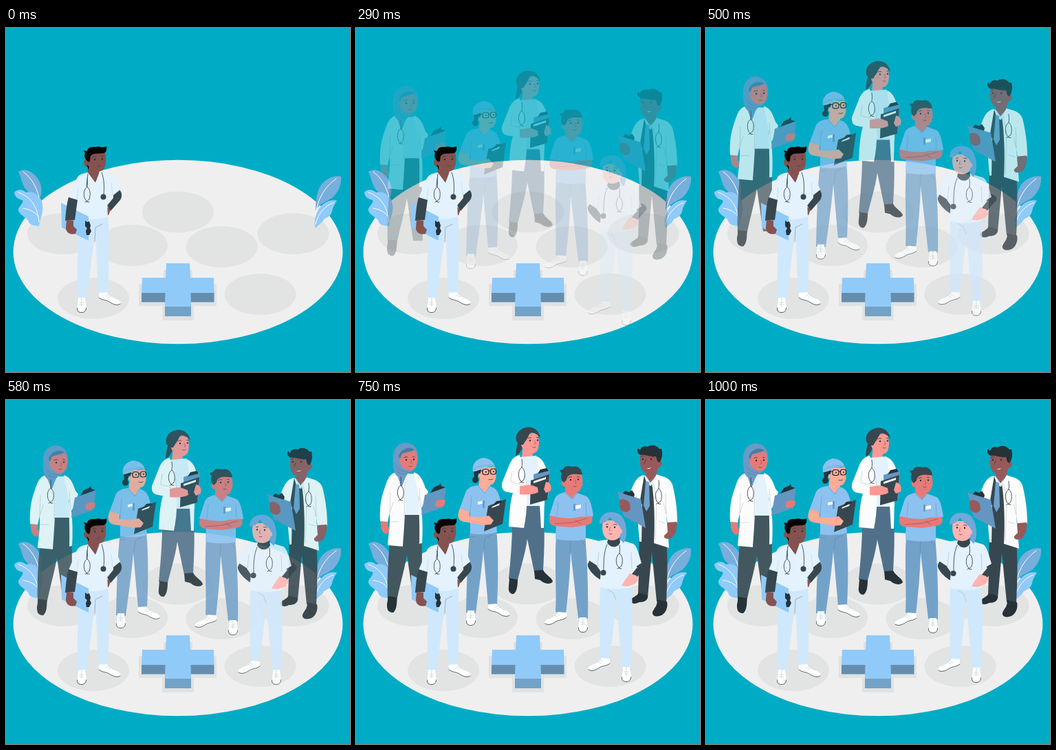
Write an HTML page that moves like this. It is 500 px wide and 500 px high and loops after 1.04 s.

```html
<!DOCTYPE html>
<html lang="en">
<head>
<meta charset="utf-8">
<title>Medical team</title>
<style>
  html, body { margin: 0; width: 100%; height: 100%; overflow: hidden; background: #00acc5; }
  svg { display: block; width: 100%; height: 100%; }
  .ink { fill: #263238; } .slate { fill: #37474f; } .black { fill: #050505; }
  .white { fill: #fcfcfc; } .pale { fill: #e3f2fd; } .ice { fill: #d0e8fc; }
  .sky { fill: #90caf9; } .scrub { fill: #8cc1f0; } .denim { fill: #73a2c9; }
  .steel { fill: #6b9ac6; } .board { fill: #6596c2; } .azure { fill: #72a8da; }
  .spot { fill: #e2e4e3; }
  .rose { fill: #e57b79; } .coral { fill: #ff9792; } .peach { fill: #ffac98; }
  .blush { fill: #ffb4b0; } .brown { fill: #98595a; } .umber { fill: #85524f; }
  .line { fill: none; stroke: #37474f; stroke-width: .9; stroke-linecap: round; stroke-linejoin: round; }
  .soft { stroke: #a94d4b; stroke-width: .7; }
  .lace { stroke: #b9cfdd; stroke-width: .7; }
  .fold { fill: none; stroke: #263238; stroke-opacity: .22; stroke-width: .8; stroke-linecap: round; }
  .vein { fill: none; stroke: #fff; stroke-width: 1; stroke-linecap: round; }
</style>
</head>
<body>
<svg viewBox="0 0 500 500">
  <defs>
    <g id="face">
      <circle r="1.2" class="ink"/><circle cx="11" cy="-.6" r="1.2" class="ink"/>
      <path class="line" d="M-3-3.4Q-1-4.8 1.500-4.2M9.500-4.6Q11-5.2 12.500-4"/>
      <path class="line soft" d="M6.5 0L8 4.500L6 5"/>
      <path class="line" d="M4 9.500Q6 10.800 8 9.500" style="stroke-width:.7"/>
    </g>
    <path id="tubes" class="line" d="M0-12Q1-6 0 0C-5 3-6 12-3 18L0 21M0 0C5 3 5 12 3 18L-1 21M-3 22L-1 21L0 22L3 22"/>
    <g id="toe">
      <path d="M2 0H12C12 6 14 11 13.500 16C13 20 10 21.500 7 21.500C3 21.500 0 19 .5 15C1 9 2 7 2 0Z" fill="#fff"/>
      <path class="line" d="M.5 15C0 20 3 21.500 7 21.500C11 21.500 13.500 19 13.500 15"/>
      <path class="line lace" d="M4 7L10 7M4 10L10 10M7 0L6.500 12"/>
    </g>
    <g id="side">
      <path d="M1 1L13 0C16 5 20 8 27 10C31 12 34 14 32 17C28 20 22 18 16 15C11 12 6 12 1 9Z" fill="#fff"/>
      <path class="line" d="M1 8C6 12 11 11 16 14C22 18 28 20 32 17"/>
      <path class="line lace" d="M11 6L15 3M14 8L18 5"/>
    </g>
  </defs>

  <ellipse cx="250" cy="325.500" rx="239.400" ry="133.800" fill="#efefef"/>
  <g id="spots" class="spot"></g>

  <g id="cross">
    <path fill="#e0e2e2" d="M229 352H271V372H306V404H273V425H227V404H193V372H229Z"/>
    <path fill="#658dae" d="M197 384H302.500V398.500H197Z"/>
    <path fill="#73a2c7" d="M231 403H269V419H231Z"/>
    <path class="sky" d="M233 342H267L268 363H302L302.500 385H268.500L269 405H231L231.500 385H197L198 363H232Z"/>
  </g>

  <g id="plants">
    <path fill="#78aedb" d="M18 209C27 202 40 209 47 220C53 230 52 239 50 246C43 238 36 242 30 236C23 229 24 221 18 209Z"/>
    <path class="sky" d="M12 239C17 233 25 235 29 239C40 236 51 244 53 256C55 266 50 276 48 288C39 287 33 286 32 279C26 273 17 270 18 263C20 258 26 254 24 250C18 249 13 246 12 239Z"/>
    <path class="vein" d="M25 209C37 218 44 230 48 246M18 239C34 244 46 258 48 282M25 262Q40 264 47 274"/>
    <path fill="#78aedb" d="M487 216C479 213 466 218 458 228C451 239 450 252 450 266C455 255 465 253 474 247C482 240 488 229 487 216Z"/>
    <path class="sky" d="M481 251C472 248 460 254 454 264C449 273 447 282 450 291C454 286 460 283 462 278C467 275 472 274 474 266C475 260 478 256 481 251Z"/>
    <path class="vein" d="M480 219C464 231 453 246 450 272M476 254C464 258 453 270 450 285"/>
  </g>

  <g id="crew">
    <g id="ponytail">
      <path fill="#50708a" d="M227 180L246 150H271C275 185 274 215 272 249L259 251L249 203C246 225 239 245 235 263L222 261C225 230 227 205 227 180Z"/>
      <path class="ink" d="M223 260L235 262C235 270 234 280 229 283C223 283 221 278 222 272ZM259 249L272 248C275 255 285 259 286 265C282 270 273 268 268 263L260 261Z"/>
      <path class="slate" d="M240 56C233 62 233 75 232 82C237 81 242 73 243 64Z"/>
      <path class="coral" d="M243 66H256L257 88L248 94L241 84Z"/>
      <path class="pale" d="M238 84L262 82L274 105V155H242Z"/>
      <path class="white" d="M238 81C229 83 225 89 222 97L212 122C211 132 216 135 223 135L228 136C223 153 223 170 222 185L244 187C250 160 249 130 246 110Z"/>
      <path class="white" d="M263 83C272 87 275 95 278 106L281 124L274 139L273 187L269 187L267 153V110Z"/>
      <path class="fold" d="M227 104L225 120L240 124M228 136L227 123M246 110L249 137"/>
      <path class="white" d="M219 119L240 125L239 138L221 135Z"/>
      <path class="board" d="M258 109L282 101L280 142L259 145Z"/>
      <path class="ink" d="M264 108L268 102L277 100L280 104Z"/>
      <path class="slate" d="M254 118L281 109L278 146L253 153Z"/>
      <path d="M258 119L276 113V116L258 122Z" fill="#fff"/>
      <path class="coral" d="M238 126C246 125 251 123 256 125L264 128L265 135C257 139 247 139 238 138ZM276 120C282 120 285 126 283 133L276 136L273 131Z"/>
      <path class="coral" d="M243 52L262 48C267 56 267 66 264 74C260 81 250 80 245 73C239 70 239 62 243 62Z"/>
      <path class="slate" d="M233 60C231 51 237 43 247 41C257 39 266 45 268 56C264 51 260 49 255 48C251 50 250 57 246 61L243 66C239 66 235 65 233 60Z"/>
      <use href="#face" x="253" y="60"/>
      <use href="#tubes" x="241" y="99"/>
    </g>

    <g id="hijab">
      <path fill="#43575f" d="M68 150H92C96 180 96 220 96 245L97 288H83L74 226C70 250 63 272 59 294L46 291C45 255 47 229 50 201Z"/>
      <path class="ink" d="M47 286L59 288C60 296 59 306 54 310C46 310 45 305 45 298Z"/>
      <path class="pale" d="M66 108H88L94 168H68Z"/>
      <path class="rose" d="M36 174L47 175L46 184L50 192L44 196C38 194 35 188 36 174Z"/>
      <path class="white" d="M60 106C50 107 47 114 44 122C38 139 34 150 35 177L46 178L49 165C50 182 47 198 46 212L68 214C70 188 73 145 71 119Z"/>
      <path class="white" d="M84 106C94 109 97 118 101 129L105 134L97 155L95 158C97 175 97 194 96 209L92 210C93 185 91 165 92 145Z"/>
      <path class="fold" d="M50 136L49 165L54 150M71 120L70 170M92 130L94 157M50 178H62"/>
      <path class="board" d="M100 139L131 128L127 157L95 168Z"/>
      <path class="ink" d="M108 136L113 128L120 125L123 122L124 126L130 128Z"/>
      <path class="rose" d="M116 149C120 145 126 145 130 147L129 153C124 158 118 157 115 155Z"/>
      <path class="steel" d="M54 88C53 72 62 62 74 63C85 65 90 72 90 83C91 96 85 104 77 107C70 112 70 122 66 128L61 113C54 107 54 98 54 88Z"/>
      <path class="rose" d="M65 80C72 78 79 77 85 74C91 81 90 95 85 101C78 106 70 102 66 97C62 90 62 84 65 80Z"/>
      <path fill="#507aa0" d="M62 82C66 72 76 68 85 73C81 76 74 76 67 79L64 87Z"/>
      <path class="fold" d="M58 97Q64 106 76 106M59 104Q65 110 73 109"/>
      <use href="#face" x="73" y="88"/>
      <use href="#tubes" x="65" y="125"/>
    </g>

    <g id="physician">
      <path class="slate" d="M411 180L448 182C454 213 453 260 451 296L437 294L430 222L424 288L410 284C411 250 412 215 411 180Z"/>
      <path class="ink" d="M411 281L424 285C425 292 419 295 411 295C404 299 399 296 398 293C400 288 408 287 411 281ZM438 291L452 294C454 302 450 311 444 314C436 317 430 315 431 309C434 302 438 301 438 291Z"/>
      <path class="slate" d="M414 112H438L440 190H411Z"/>
      <path class="pale" d="M419 111L435 109L429 126L423 124Z"/>
      <path fill="#6fa1cb" d="M421 119L426 120L427 155L422 163L418 154Z"/>
      <path class="white" d="M419 110C409 112 406 118 402 127L397 139L416 153L415 207L412 207L409 170Z"/>
      <path class="white" d="M436 109C449 113 456 114 460 124C464 140 467 158 467 179L453 182L451 167C452 185 454 201 455 216L433 209C435 175 433 140 430 122Z"/>
      <path class="fold" d="M450 137L451 167L447 151M432 122L437 145L435 205M440 177L449 180"/>
      <path class="brown" d="M453 179L466 178C467 188 465 197 458 202C451 204 447 202 448 198L453 193Z"/>
      <path class="board" d="M380 134L414 145L421 187L389 170Z"/>
      <path class="ink" d="M388 137L391 133L397 135L401 132L405 138L404 142Z"/>
      <path class="brown" d="M383 147C387 143 395 146 398 151L399 159C396 165 390 166 384 159Z"/>
      <path class="brown" d="M424 99H439L436 111L428 121L421 111Z"/>
      <path class="brown" d="M414 79L438 81L440 89C446 89 447 97 440 99C435 107 426 110 419 106C412 101 412 90 414 79Z"/>
      <path class="ink" d="M414 81C409 79 408 75 410 71L413 74C414 69 419 67 424 69C430 65 437 67 441 72L444 72C446 79 445 87 441 92L438 90L436 83C428 84 420 80 414 81Z"/>
      <circle cx="417" cy="87" r="1.200" class="ink"/><circle cx="429" cy="87" r="1.200" class="ink"/>
      <path class="line" d="M414 83.500L418 82.500M427 82.500Q430 81.500 432 84M421 88L419 94"/>
      <path fill="#fff" d="M421 99.500Q424 101 429 99Q426 102.500 421 99.500Z"/>
      <use href="#tubes" x="440" y="130"/>
    </g>

    <g id="nurse">
      <path class="denim" d="M166 188H204C207 220 207 260 205 299L192 299L185 220C182 255 177 287 174 311L160 310C161 268 162 224 166 188Z"/>
      <path class="fold" d="M186 218L188 201L198 197M166 200H173"/>
      <use href="#toe" x="160" y="307"/><use href="#side" x="191" y="297"/>
      <circle cx="173.500" cy="117" r="4.500" class="ink"/>
      <path class="peach" d="M180 113H195V127L188 136L178 127Z"/>
      <path class="scrub" d="M178 125C166 126 161 130 159 136L151 158L166 164L166 195C178 197 193 197 205 193L202 161L211 151C208 140 207 132 199 128L193 126L188 136Z"/>
      <path class="peach" d="M151 158L165 163L165 170L184 172L194 170L199 177C196 183 188 184 181 182L157 178C147 176 147 168 151 158Z"/>
      <path class="fold" d="M168 141L166 163M178 126L187 137L194 127"/>
      <path class="slate" d="M192 155L218 145L213 181L186 192Z"/>
      <path class="ink" d="M199 154L204 148L211 147L212 150Z"/>
      <path d="M198 156L209 151L208 154L197 158Z" fill="#fff"/>
      <path class="peach" d="M181 171L193 169L200 176L196 182L183 183Z"/>
      <path fill="#fff" d="M177 149L187 147V151L177 153Z"/><path class="steel" d="M184 147H187V158H184Z"/>
      <path class="peach" d="M180 99L202 98C205 108 204 118 199 123C192 127 185 122 181 115C176 113 177 108 181 108Z"/>
      <path class="ink" d="M171 103L182 100L181 107L178 108L176 116L172 113Z"/>
      <path class="scrub" d="M170 105C168 94 175 87 184 85C193 85 200 90 202 98C193 96 187 99 182 102C178 103 174 105 170 105Z"/>
      <path class="fold" d="M171 101Q181 94 201 96"/>
      <circle cx="189" cy="105.500" r="1.100" class="ink"/><circle cx="200" cy="105" r="1.100" class="ink"/>
      <path class="line" d="M193 116.500Q196 118 199 116"/>
      <g class="line" style="stroke:#182126;stroke-width:1.100"><rect x="184" y="101.500" width="9" height="8" rx="3"/><rect x="195.500" y="101" width="8" height="8" rx="3"/><path d="M179 104H184M193 104H195.500"/></g>
    </g>

    <g id="crossed">
      <path class="denim" d="M291 198H333C336 232 338 277 337 319L323 318L312 222C311 255 308 286 305 312L290 309C292 275 288 237 291 198Z"/>
      <path class="fold" d="M311 224L312 206M327 204L332 212"/>
      <use href="#side" transform="translate(307 309)scale(-1 1)"/>
      <use href="#toe" x="323" y="317"/>
      <path class="rose" d="M304 123H320L321 137L314 144L304 137Z"/>
      <path class="scrub" d="M304 135C293 137 290 141 288 147L281 169L291 176L290 203C305 206 320 206 334 204V180L345 169C343 157 341 145 335 141L321 136L314 144Z"/>
      <path class="fold" d="M294 149L292 169M334 150L335 169M304 136L314 145L321 137"/>
      <path fill="#fff" d="M316 155L327 153V158L316 160Z"/><path class="steel" d="M316 152H319V162H316Z"/>
      <path class="rose" d="M282 169C296 172 312 175 324 171L343 170C345 178 342 182 334 183L314 186L289 184C281 183 280 177 282 169Z"/>
      <path class="line soft" d="M290 181L315 179L336 173M319 176L327 181"/>
      <path class="rose" d="M303 107L327 107C331 117 330 127 325 133C318 138 309 133 305 127C297 127 297 118 303 117Z"/>
      <path class="slate" d="M302 121C299 118 296 113 299 108L296 103L301 102C303 96 309 97 315 98C322 96 328 101 329 109C325 110 320 108 314 109C309 110 307 112 306 117Z"/>
      <use href="#face" x="312" y="117"/>
    </g>

    <g id="bluehair">
      <path class="ice" d="M356 266H400C403 308 402 350 400 391L387 390L378 291C376 324 372 351 368 380L354 377C356 339 352 306 356 266Z"/>
      <path class="fold" d="M378 292L374 281L366 277"/>
      <use href="#side" transform="translate(370 376)scale(-1 1)"/>
      <use href="#toe" x="386" y="389"/>
      <path class="slate" d="M343 228L352 236L350 242L357 252L355 262C346 257 335 245 337 239ZM402 239L412 232C419 235 424 238 422 243L407 260L400 255L409 244Z"/>
      <path class="pale" d="M366 204C352 205 347 207 345 212L337 233L351 242L356 248L354 273C370 277 389 277 401 273L399 248L415 238C411 225 409 214 403 210L383 204L374 211Z"/>
      <path class="slate" d="M367 201L383 202L384 208C380 217 369 216 365 208Z"/>
      <path class="fold" d="M353 222L351 242M400 223L401 246"/>
      <path class="blush" d="M398 253L407 256L411 261L406 268L395 272L386 271L390 264Z"/>
      <path class="blush" d="M359 176L381 176L386 188L385 196C383 203 376 207 367 204C358 201 357 188 359 176Z"/>
      <path class="azure" d="M354 181C354 170 361 164 371 164C383 163 390 172 392 183C394 193 393 202 389 209C386 206 383 203 384 196L386 190L382 183C377 180 372 176 369 171C366 177 361 180 354 181Z"/>
      <ellipse cx="384.500" cy="192" rx="2.500" ry="3.500" class="blush"/>
      <use href="#face" transform="translate(376 186)scale(-1 1)"/>
      <path class="line" d="M365 211C360 222 360 236 360 248"/>
      <circle cx="359.500" cy="252" r="4" class="slate"/>
      <use href="#tubes" x="383" y="224"/>
    </g>
  </g>

  <g id="lead">
    <path class="ice" d="M107 270H148C151 308 149 350 148 387L134 386L130 294C125 330 121 363 117 397L103 395C104 355 104 311 107 270Z"/>
    <path class="line" d="M129 310L130 290L140 285" style="stroke:#9aabb6"/>
    <use href="#toe" x="103" y="392"/><use href="#side" x="134" y="384"/>
    <path class="slate" d="M156 240L165 235C169 240 169 245 166 250L152 266L147 258L156 247Z"/>
    <path class="umber" d="M147 260L152 264L149 272L147 272Z"/>
    <path class="umber" d="M119 204H135L136 215L130 225L119 214Z"/>
    <path class="pale" d="M119 210C107 212 104 215 102 221L91 247L104 251L107 275C121 280 137 278 148 274L147 252L156 243L166 235C162 225 159 214 151 212L136 209L130 225Z"/>
    <path class="fold" d="M105 232L103 251M153 225L155 243" style="stroke-opacity:.14"/>
    <path class="sky" d="M80 254L120 274V309L81 290Z"/>
    <path class="slate" d="M91 246L104 250L100 279L86 280C87 268 88 256 91 246Z"/>
    <path class="umber" d="M88 279L98 280L98 288L103 293L101 299C94 301 87 298 87 290Z"/>
    <path class="ink" d="M115 280L118 282L121 281L123 287L122 291L124 295L121 301L117 301L116 295L118 291L115 288Z"/>
    <path class="umber" d="M118 181L144 179C146 188 146 199 142 205C136 212 126 208 121 202C113 203 110 193 117 190Z"/>
    <path class="black" d="M120 195C115 191 113 187 115 182L113 178L118 179C119 172 126 173 129 173C135 171 141 175 146 172C147 178 145 181 142 182C135 183 127 181 123 186L122 193ZM117 198L121 202L120 206Z"/>
    <use href="#face" x="129" y="191"/>
    <path class="line" d="M119 212L117 230M139 210C143 220 143 232 142 242"/>
    <circle cx="141.500" cy="245.500" r="4" class="slate"/>
    <use href="#tubes" x="118" y="231"/>
  </g>
</svg>

<script>
  const LOOP = 1040, FRAME = 1000 / 24, SETTLE = 18, LAST = 24;
  const SVG = 'http://www.w3.org/2000/svg';
  const spots = document.getElementById('spots');
  const crew = [...document.getElementById('crew').children];

  for (const [cx, cy] of [[83, 299], [250, 267.5], [417.5, 299], [183, 316], [313.5, 318], [127, 393], [369.5, 387]]) {
    const spot = document.createElementNS(SVG, 'ellipse');
    for (const [key, value] of Object.entries({ cx, cy, rx: 52, ry: 30 })) spot.setAttribute(key, value);
    spots.append(spot);
  }

  const ease = p => (1 - Math.cos(Math.PI * Math.min(1, Math.max(0, p)))) / 2;

  // The crew rises while fading in, overshoots by a pixel, then settles.
  function render(time) {
    const step = Math.floor((time % LOOP + 5) / FRAME);
    const rise = ease((step - 0.5) / (SETTLE - 0.5));
    const back = ease((step - SETTLE) / (LAST - SETTLE));
    const offset = 31 - 32 * rise + back;
    for (const person of crew) {
      person.setAttribute('transform', `translate(0 ${offset.toFixed(2)})`);
      person.setAttribute('opacity', rise.toFixed(3));
    }
  }

  const start = performance.now();
  function tick() {
    render(performance.now() - start);
    requestAnimationFrame(tick);
  }
  tick();
</script>
</body>
</html>
```
